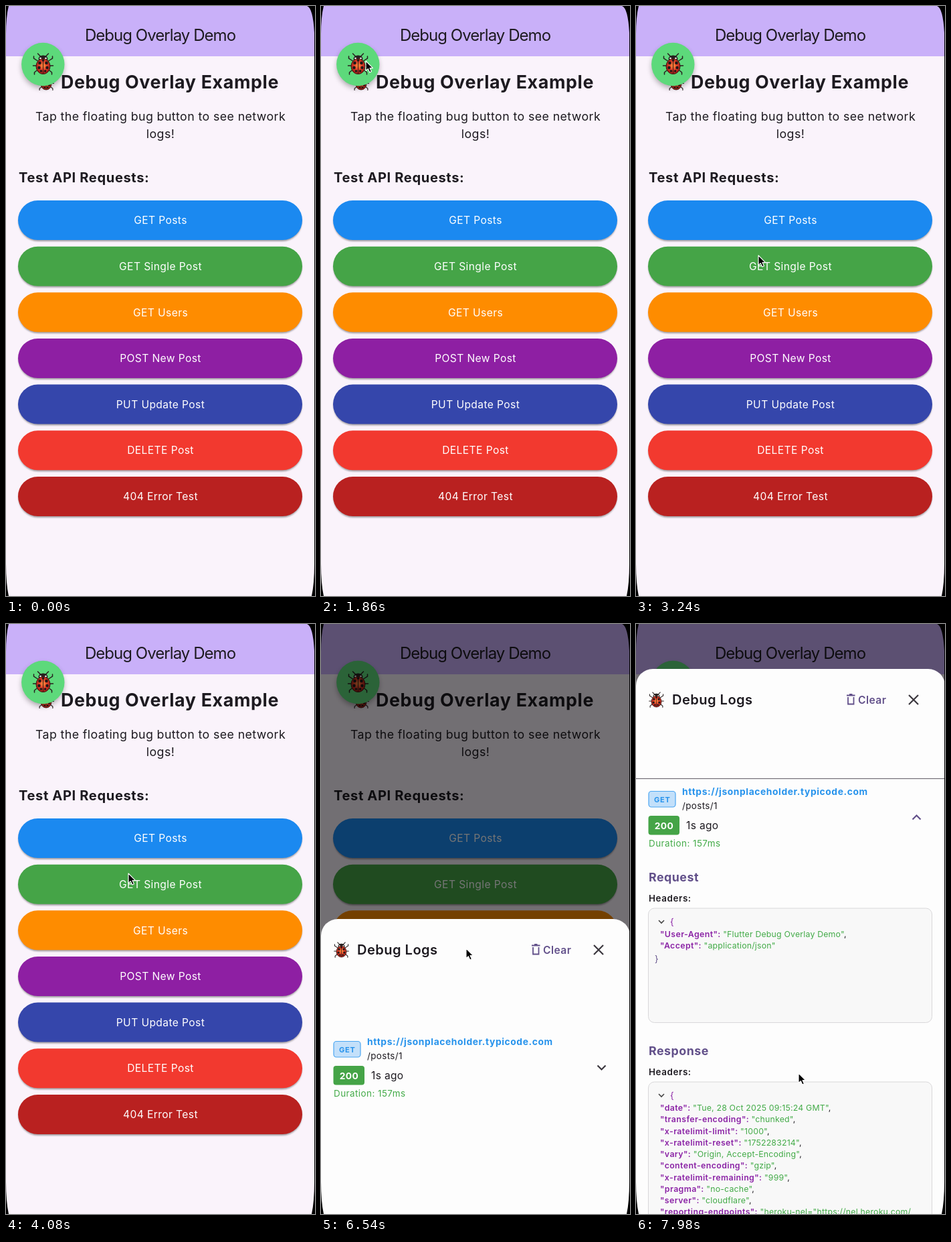
Animation of 462 by 880 pixels, one loop 8000 ms. Source, as an HTML page:

```html
<!DOCTYPE html>
<html lang="en">
<head>
<meta charset="utf-8">
<title>Debug overlay demo</title>
<style>
  html, body { margin: 0; width: 100%; height: 100%; overflow: hidden; background: #faf3fb; }
  svg { display: block; width: 462px; height: 880px; }
  text { font-family: Inter, "Open Sans", sans-serif; white-space: pre; }
</style>
</head>
<body>
<svg id="stage" viewBox="0 0 462 880"></svg>
<script>
const LOOP = 8000;
const INK = '#1d1a20', PURPLE = '#62508a', BLUE = '#2793ec', GREEN = '#43ab48';

const escapeText = s => s.replace(/&/g, '&amp;').replace(/</g, '&lt;');

function text(x, y, size, str, { weight = 400, fill = INK, gap = 0.4, anchor = 'start' } = {}) {
  return `<text x="${x}" y="${y}" font-size="${size}" font-weight="${weight}" fill="${fill}"
    letter-spacing="${gap}" text-anchor="${anchor}">${escapeText(str)}</text>`;
}

function box(x, y, w, h, r, fill, extra = '') {
  return `<rect x="${x}" y="${y}" width="${w}" height="${h}" rx="${r}" fill="${fill}" ${extra}/>`;
}

function stroke(d, color, width, extra = '') {
  return `<path d="${d}" fill="none" stroke="${color}" stroke-width="${width}" ${extra}/>`;
}

const bug = (x, y, scale) => `<use href="#bug" transform="translate(${x} ${y}) scale(${scale})"/>`;

const defs = `<defs>
  <filter id="soft" x="-30%" y="-30%" width="160%" height="160%"><feGaussianBlur stdDeviation="4"/></filter>
  <filter id="thin" x="-5%" y="-20%" width="110%" height="140%"><feGaussianBlur stdDeviation="1.2"/></filter>
  <radialGradient id="shell" cy=".45"><stop offset="0" stop-color="#ff9a3d"/>
    <stop offset=".5" stop-color="#e4472c"/><stop offset="1" stop-color="#a81f18"/></radialGradient>
  <clipPath id="reveal"><rect id="revealBox" y="270" width="462" height="0"/></clipPath>
  <g id="bug">
    ${stroke('M-3-11L-8-16M3-11L8-16M-8-5L-14-9V-12M8-5L14-9V-12M-9 2H-15M9 2H15M-8 8L-13 12V15M8 8L13 12V15',
      '#27201f', 1.5, 'stroke-linecap="round"')}
    <ellipse cy="-8" rx="7" ry="5.5" fill="#27201f"/>
    <ellipse cy="3" rx="10.5" ry="11.5" fill="url(#shell)" stroke="#3a1714"/>
    ${stroke('M0-8V14', '#3a1714', 1)}
    ${[[-5, -2, 2.3], [5, -2, 2.3], [-6, 5, 2.2], [6, 5, 2.2], [-3, 10, 1.8], [3, 10, 1.8], [0, -6, 1.8]]
      .map(([x, y, r]) => `<circle cx="${x}" cy="${y}" r="${r}" fill="#211918"/>`).join('')}
    <circle cx="-4" cy="-9" r="1.3" fill="#eee"/><circle cx="4" cy="-9" r="1.3" fill="#eee"/>
  </g>
</defs>`;

const buttons = [
  ['GET Posts', '#1b89f0'], ['GET Single Post', '#45a447'], ['GET Users', '#fe8c00'],
  ['POST New Post', '#8e1fa3'], ['PUT Update Post', '#3546ab'], ['DELETE Post', '#f2392f'],
  ['404 Error Test', '#b92120'],
].map(([label, color], i) => {
  const y = 290 + i * 68.65;
  return box(18.5, y + 2, 424, 59, 29.5, '#000', 'opacity=".35" filter="url(#thin)"')
    + box(18, y, 425, 59, 29.5, color)
    + text(231, y + 35.2, 15.6, label, { fill: '#fff', anchor: 'middle' });
}).join('');

const app = `
  ${box(0, 0, 462, 880, 0, '#faf3fb')}
  ${box(0, 0, 462, 75, 0, '#c9b0f9')}
  ${text(230.5, 52, 24, 'Debug Overlay Demo', { gap: -0.95, anchor: 'middle' })}
  ${bug(60, 114, 0.76)}
  ${text(82, 123, 26.8, 'Debug Overlay Example', { weight: 700, gap: 0.65 })}
  ${text(231, 171, 17.8, 'Tap the floating bug button to see network', { anchor: 'middle' })}
  ${text(231, 197, 17.8, 'logs!', { anchor: 'middle' })}
  ${text(19, 263, 20.1, 'Test API Requests:', { weight: 700, gap: 0.63 })}
  ${buttons}
  <g id="response">
    ${text(19, 817.5, 17.8, 'Last Response:', { weight: 700, gap: 0.7 })}
    ${box(18, 833, 425, 80, 9, '#ebebeb')}
    ${text(32, 862, 13.4, 'Status: 200', { gap: 0.5 })}
    ${text(32, 881.5, 13.4, 'URL: https://jsonplaceholder.typicode.com/posts/1', { gap: 0.37 })}
  </g>
  <circle cx="55" cy="91" r="31" opacity=".35" filter="url(#soft)"/>
  <circle cx="55.3" cy="87" r="32.2" fill="#5dd97b"/>
  ${bug(55.5, 87, 1)}`;

const empty = `<g id="empty">
  ${box(206, 249, 49, 49, 4, 'none', 'stroke="#9b999b" stroke-width="6"')}
  ${stroke('M206 282H219Q221 290 230.500 290T242 282H255', '#9b999b', 6)}
  ${text(231, 349, 17.8, 'No network logs yet', { fill: '#9d9c9d', gap: 0.63, anchor: 'middle' })}
</g>`;

function jsonLine(y, key, value, end = ',') {
  return `<text x="36" y="${y}" font-size="12.3" fill="${GREEN}" letter-spacing=".2">`
    + `<tspan font-weight="600" fill="#8a22a5" letter-spacing=".42">"${key}": </tspan>`
    + `${escapeText(value)}<tspan fill="${INK}">${end}</tspan></text>`;
}

function section(y, title, height, rows) {
  return text(19, y, 17.8, title, { weight: 700, fill: PURPLE, gap: 0.5 })
    + text(19, y + 30, 13.4, 'Headers:', { weight: 600, gap: 0.6 })
    + box(18.5, y + 40, 424, height, 9, '#f8f8f8', 'stroke="#d9d8da"')
    + stroke(`M34 ${y + 58}l4 4l4-4`, '#444', 1.6)
    + text(51, y + 65, 13, '{', { fill: '#8a22a5' })
    + rows.map(([key, value, end], i) => jsonLine(y + 83 + i * 17.25, key, value, end)).join('');
}

const details = `<g clip-path="url(#reveal)">
  ${section(317, 'Request', 170.5, [
    ['User-Agent', '"Flutter Debug Overlay Demo"'],
    ['Accept', '"application/json"', ''],
  ])}
  ${text(28, 437, 13, '}', { fill: PURPLE })}
  ${section(576, 'Response', 400, [
    ['date', '"Tue, 28 Oct 2025 09:15:24 GMT"'],
    ['transfer-encoding', '"chunked"'],
    ['x-ratelimit-limit', '"1000"'],
    ['x-ratelimit-reset', '"1752283214"'],
    ['vary', '"Origin, Accept-Encoding"'],
    ['content-encoding', '"gzip"'],
    ['x-ratelimit-remaining', '"999"'],
    ['pragma', '"no-cache"'],
    ['server', '"cloudflare"'],
    ['reporting-endpoints', '"heroku-nel="https://nel.heroku.com/', ''],
  ])}
</g>`;

const logEntry = `<g id="entry">
  ${box(0, 163, 462, 1.2, 0, '#747078', 'id="divider"')}
  ${box(19, 182.5, 40, 23.5, 4, '#c3e0fa', 'stroke="#4ba6f2" stroke-width="1.2"')}
  ${text(39.3, 198.5, 11, 'GET', { weight: 700, fill: BLUE, gap: 0.7, anchor: 'middle' })}
  ${text(69, 188, 13.8, 'https://jsonplaceholder.typicode.com', { weight: 700, fill: BLUE, gap: 0.6 })}
  ${text(69, 209, 13.4, '/posts/1', { gap: 0.4 })}
  ${box(18.5, 219, 46.5, 28.5, 4, '#45a447')}
  ${text(42, 238.5, 13.8, '200', { weight: 700, fill: '#fff', anchor: 'middle' })}
  ${text(75, 239, 15.5, '1s ago', { gap: 0.35 })}
  ${text(19, 265, 13.4, 'Duration: 157ms', { fill: GREEN, gap: 0.47 })}
  <g id="chevron">${stroke('M-6-3L0 3L6-3', 'currentColor', 2.2)}</g>
  ${details}
</g>`;

const sheet = `<g id="sheet">
  ${box(0, 0, 462, 900, 25, '#fdfdfd')}
  ${bug(30.5, 46.5, 0.72)}
  ${text(54, 53, 20.1, 'Debug Logs', { weight: 600, gap: 0.45 })}
  ${stroke('M317 42V52.500H325.500V42M315 39.500H327.500M319 38H323.500', PURPLE, 1.8)}
  ${text(332, 52, 15.6, 'Clear', { weight: 600, fill: PURPLE, gap: 0.45 })}
  ${stroke('M408 39L422 53M422 39L408 53', '#3c383f', 2.2)}
  ${empty}${logEntry}
</g>`;

const bezel = `<path d="M0 0H4Q0 16 0 42ZM0 832Q0 862 4 880H0ZM462 0H450Q459 3 461 40V832Q461 862 457 880H462Z"/>`;

const cursor = `<path id="cursor" d="M0 0V14.500L3.400 11.600L5.800 17L8.400 15.800L6 10.600H10.500Z"
  stroke="#fff" stroke-width="1.1" stroke-linejoin="round"/>`;

document.getElementById('stage').innerHTML = defs + app
  + box(0, 0, 462, 880, 0, '#000', 'id="dim"') + sheet + bezel + cursor;

const part = id => document.getElementById(id);
const parts = Object.fromEntries(
  ['response', 'dim', 'sheet', 'empty', 'entry', 'divider', 'chevron', 'revealBox', 'cursor'].map(id => [id, part(id)]));

const progress = (t, from, to) => Math.min(1, Math.max(0, (t - from) / (to - from)));
const smooth = p => p * p * (3 - 2 * p);
const decelerate = p => 1 - (1 - p) ** 3;
const show = (el, on) => el.setAttribute('visibility', on ? 'visible' : 'hidden');

// Pointer stops: time, x, y
const stops = [
  [1200, 480, 330], [1780, 67, 82], [2120, 67, 82], [2440, 179, 728], [2540, 179, 728],
  [2900, 183, 372], [4380, 183, 372], [5060, 70, 95], [5460, 70, 95], [6300, 217, 484],
  [6560, 217, 484], [7000, 217, 111], [7080, 217, 111], [7380, 243, 280], [7560, 243, 280], [7960, 243, 670],
];

function pointerAt(t) {
  let [, x, y] = stops[0];
  for (let i = 1; i < stops.length; i++) {
    const [t0, x0, y0] = stops[i - 1], [t1, x1, y1] = stops[i];
    if (t < t0) break;
    const p = smooth(progress(t, t0, t1));
    x = x0 + (x1 - x0) * p;
    y = y0 + (y1 - y0) * p;
  }
  return [x, y];
}

function render(t) {
  const open = t < 4000
    ? decelerate(progress(t, 1980, 2230)) - decelerate(progress(t, 3000, 3200))
    : decelerate(progress(t, 5260, 5510));
  const top = 880 - 440 * open - 373 * smooth(progress(t, 6560, 7000));
  const expanded = smooth(progress(t, 7460, 7660));
  const answered = t >= 4400;

  show(parts.response, answered);
  show(parts.empty, !answered);
  show(parts.entry, answered);
  parts.dim.setAttribute('opacity', 0.54 * open);
  parts.sheet.setAttribute('transform', `translate(0 ${top})`);
  parts.divider.setAttribute('opacity', expanded);
  parts.revealBox.setAttribute('height', 560 * expanded);
  parts.chevron.setAttribute('transform', `translate(419.500 221.500) rotate(${180 * expanded})`);
  parts.chevron.setAttribute('color', expanded > 0.5 ? PURPLE : '#3c383f');
  parts.cursor.setAttribute('transform', `translate(${pointerAt(t)})`);
}

function frame() {
  render(performance.now() % LOOP);
  requestAnimationFrame(frame);
}
frame();
</script>
</body>
</html>
```
